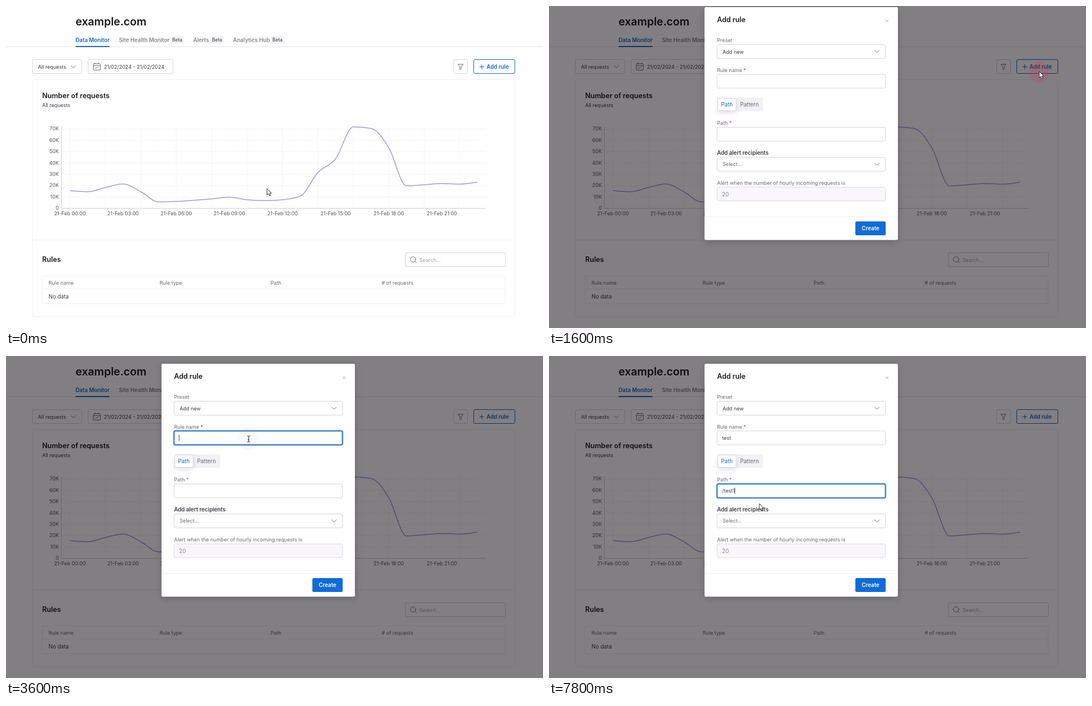
An HTML page that plays this animation: 965x580 px, repeating every 8 s.

```html
<!DOCTYPE html>
<html lang="en">
<head>
<meta charset="utf-8">
<title>Add rule</title>
<style>
html, body { margin: 0; width: 100%; height: 100%; overflow: hidden; background: #fff; }
svg { display: block; width: 965px; height: 580px; font-family: Inter, "Open Sans", sans-serif; }
text { font-size: 9.1px; fill: #3c3d45; white-space: pre; }
.h1 { font-size: 19.6px; font-weight: 600; fill: #16171c; }
.h2 { font-size: 12.6px; font-weight: 600; fill: #1c1d24; }
.tab { font-size: 9.8px; font-weight: 600; fill: #85868d; }
.blue { fill: #1567c9; }
.beta { font-size: 8.4px; font-weight: 500; fill: #4c4d54; }
.md { font-size: 9.8px; }
.bold { font-size: 9.8px; font-weight: 600; }
.dim { fill: #686a74; }
.ghost { fill: #a3a4ac; }
.axis { font-size: 9px; fill: #55565d; }
.box { fill: #fff; stroke: #d6d6dd; }
.faint { fill: none; stroke: #eff0f4; }
.icon { fill: none; stroke: #6d6e77; stroke-linecap: round; stroke-linejoin: round; }
.focus { fill: #fff; stroke: #2b78d0; stroke-width: 2; filter: drop-shadow(0 0 1.5px #7fb2ec); }
.hover { stroke: #a4a4ad; }
.req { fill: #e0315a; }
</style>
</head>
<body>
<svg viewBox="0 0 965 580">
  <g id="page">
    <text class="h1" x="125" y="35">example.com</text>
    <path d="M0 73.5H965" stroke="#e6e6ea"/>
    <path d="M125 73H186" stroke="#1567c9" stroke-width="2"/>
    <text class="tab blue" x="125" y="65">Data Monitor</text>
    <text class="tab" x="203" y="65">Site Health Monitor</text>
    <text class="tab" x="336.5" y="65">Alerts</text>
    <text class="tab" x="408" y="65">Analytics Hub</text>
    <g id="badges"></g>

    <rect class="box" x="47.5" y="96.5" width="88.5" height="25" rx="2.5"/>
    <text x="57.5" y="113">All requests</text>
    <path class="icon" d="M117 107.5l4 4 4-4"/>
    <rect class="box" x="147.5" y="96.5" width="152.5" height="25" rx="2.5"/>
    <g class="icon"><rect x="157" y="104" width="12.5" height="11.5" rx="1.5"/><path d="M157 107.5h12.5M160 102.5v2M166.500 102.5v2M160 113l2-2 1.500 1 2.500-2.500"/></g>
    <text x="176" y="113">21/02/2024 - 21/02/2024</text>
    <rect class="box" x="804.5" y="96.5" width="25" height="25" rx="2.5"/>
    <path class="icon" d="M812.500 105h9l-3.300 4.500v3.700l-2.400 1.500v-5.200z"/>
    <rect x="840.5" y="96.5" width="74" height="25" rx="2.5" fill="#fff" stroke="#1567c9"/>
    <path d="M851 109.500h8M855 105.500v8" stroke="#1567c9" stroke-width="1.100"/>
    <text class="bold blue" x="863.5" y="113">Add rule</text>

    <rect class="faint" x="47.5" y="132.5" width="867" height="427" rx="5"/>
    <path class="faint" d="M48 421.5H914"/>
    <text class="h2" x="65" y="166">Number of requests</text>
    <text x="65" y="181.500">All requests</text>
    <g id="chart"></g>

    <text class="h2" x="65" y="461">Rules</text>
    <rect class="box" x="717.5" y="444.5" width="180" height="25" rx="2.5"/>
    <g class="icon"><circle cx="731.5" cy="456.500" r="4.800"/><path d="M735 460l2.500 2.500"/></g>
    <text class="ghost" x="743" y="460.500">Search...</text>
    <rect class="faint" x="64.5" y="486.5" width="832.5" height="50" rx="3"/>
    <path class="faint" d="M65 509.5H897"/>
    <text class="dim" x="76.500" y="501.500">Rule name</text>
    <text class="dim" x="276" y="501.500">Rule type</text>
    <text class="dim" x="475.500" y="501.500">Path</text>
    <text class="dim" x="675" y="501.500"># of requests</text>
    <text class="md" x="76.500" y="526.500">No data</text>
  </g>

  <rect id="mask" width="965" height="580" fill="#040006"/>

  <g id="modal">
    <rect x="279.500" y="14" width="347.500" height="419.500" rx="2.500" fill="#fff" style="filter:drop-shadow(0 3px 6px #0003)"/>
    <path d="M280 391.5H627" stroke="#efeff3"/>
    <text class="h2" x="302" y="41">Add rule</text>
    <path d="M605 36.500l5 5m0-5l-5 5" stroke="#a2a2aa" stroke-width=".9"/>
    <text class="dim" x="302" y="77">Preset</text>
    <rect id="preset" class="box" x="302" y="81.5" width="302.500" height="25" rx="2.500"/>
    <text x="312" y="97.500">Add new</text>
    <path class="icon" d="M585.500 92l4 4 4-4"/>
    <text class="dim" x="302" y="130.500">Rule name <tspan class="req">*</tspan></text>
    <rect id="nameBox" class="box" x="302" y="135" width="302.500" height="25" rx="2.500"/>
    <text id="name" x="311" y="151"></text>
    <rect x="302" y="177" width="82.500" height="24.500" rx="2.500" fill="#f2f1f5"/>
    <rect x="303.500" y="178.500" width="32.500" height="22" rx="2" fill="#fff" stroke="#dcdbe4" style="filter:drop-shadow(0 4px 5px #50307026)"/>
    <text class="md blue" x="309.300" y="192.700">Path</text>
    <text class="md dim" x="343.500" y="192.700">Pattern</text>
    <text class="dim" x="302" y="226">Path <tspan class="req">*</tspan></text>
    <rect id="pathBox" class="box" x="302" y="230.5" width="302.500" height="25" rx="2.500"/>
    <text id="path" x="311" y="246.300"></text>
    <path id="caret" d="M0 0V11" stroke="#26272d" stroke-width=".9"/>
    <text class="bold" x="302" y="280.300">Add alert recipients</text>
    <rect class="box" x="302" y="284.5" width="302.500" height="25" rx="2.500"/>
    <text class="dim" x="312" y="300.300">Select...</text>
    <path class="icon" d="M585.500 295l4 4 4-4"/>
    <text class="dim" x="302" y="334">Alert when the number of hourly incoming requests is</text>
    <rect x="302" y="338.5" width="302.500" height="24.500" rx="2.500" fill="#f9f7fc" stroke="#dcdae2"/>
    <text class="md" x="311" y="354.700" style="fill:#85858e">20</text>
    <rect x="550.500" y="400" width="54.500" height="25" rx="2.500" fill="#0f6cd8"/>
    <text class="bold" x="562" y="416" style="fill:#fff">Create</text>
  </g>

  <circle id="ring" fill="#d0405f" stroke="#c0304f" stroke-dasharray="4 2"/>
  <path id="arrow" d="M0 0V11.200L2.600 8.900L4.500 13L6.400 12.200L4.600 8.100H8Z" fill="#fff" stroke="#1c1c20" stroke-width=".9"/>
  <path id="beam" d="M-2.500-5.500Q0-5.500 0-4Q0-5.500 2.500-5.500M0-4V4M-2.500 5.500Q0 5.500 0 4Q0 5.500 2.500 5.500M-1.500 1.500H1.500" fill="none" stroke="#1c1c20"/>
</svg>
<script>
const LOOP = 8000, TICK = 200;
const $ = id => document.getElementById(id);

function add(parent, tag, attrs, label = "") {
  const el = document.createElementNS("http://www.w3.org/2000/svg", tag);
  for (const k in attrs) el.setAttribute(k, attrs[k]);
  el.textContent = label;
  parent.append(el);
  return el;
}

// Smooth path with monotone cubic tangents over evenly spaced points
function monotone(ys, x0, dx) {
  const n = ys.length;
  const s = ys.slice(1).map((y, i) => (y - ys[i]) / dx);
  const m = ys.map((_, i) => {
    const a = s[i - 1], b = s[i];
    if (i === 0 || i === n - 1) return 0;
    return (Math.sign(a) + Math.sign(b)) *
      Math.min(Math.abs(a), Math.abs(b), Math.abs(a + b) / 4);
  });
  m[0] = (3 * s[0] - m[1]) / 2;
  m[n - 1] = (3 * s[n - 2] - m[n - 2]) / 2;
  let d = `M${x0} ${ys[0]}`;
  for (let i = 1; i < n; i++) {
    const x = x0 + i * dx, c = dx / 3;
    d += `C${x - dx + c} ${ys[i - 1] + m[i - 1] * c} ${x - c} ${ys[i] - m[i] * c} ${x} ${ys[i]}`;
  }
  return d;
}

function drawChart() {
  const g = $("chart"), x0 = 115, dx = 31.82, base = 364.5, row = 20.4;
  let grid = "";
  for (let h = 0; h < 24; h += 2) grid += `M${x0 + h * dx} 217V364`;
  for (let k = 1; k < 8; k++) grid += `M99 ${base - k * row}H862`;
  add(g, "path", { d: grid, stroke: "#ececf0", "stroke-dasharray": "2 2", fill: "none" });
  add(g, "path", { d: "M99.500 217V364.500H862", stroke: "#cfcfd5", fill: "none" });
  for (let k = 0; k < 8; k++)
    add(g, "text", { class: "axis", x: 95, y: base - k * row + 2.7, "text-anchor": "end" }, k ? k + "0K" : "0");
  for (let h = 0; h < 24; h += 3)
    add(g, "text", { class: "axis", x: x0 + h * dx, y: 376.5, "text-anchor": "middle" },
      `21-Feb ${String(h).padStart(2, "0")}:00`);
  const ys = [332.5, 334.5, 327, 320.5, 334.5, 352.8, 352, 350, 347.5, 344.3, 349, 350.6,
    349, 342.5, 300, 275, 217.8, 220.5, 255, 324, 322, 319.7, 320.8, 317.2];
  add(g, "path", { d: monotone(ys, x0, dx), fill: "none", stroke: "#a298e2", "stroke-width": 1.5 });
}

for (const x of [296, 367.5, 476]) {
  add($("badges"), "rect", { x, y: 54, width: 24, height: 14, rx: 3, fill: "#f3f3f5" });
  add($("badges"), "text", { class: "beta", x: x + 2.8, y: 64.2 }, "Beta");
}
drawChart();

// time, x, y of the pointer
const moves = [
  [0, 469, 329], [200, 488, 322], [400, 570, 286], [600, 690, 222], [800, 800, 155],
  [1000, 868, 122], [1200, 881, 118], [1600, 881, 118], [1800, 862, 117], [2000, 750, 108],
  [2200, 600, 96], [2400, 500, 90], [2600, 468, 94], [2800, 461, 108], [3000, 446, 134],
  [3200, 436, 149.5], [4400, 436, 149.5], [4600, 408, 205], [4800, 381, 247],
  [5000, 380, 249], [5200, 377, 263.5], [5400, 378, 266], [8000, 378, 266]
];
// time, value
const nameSteps = [[0, ""], [3800, "t"], [4000, "te"], [4200, "tes"], [4400, "test"]];
const pathSteps = [[0, ""], [6000, "/"], [6600, "/te"], [7000, "/tes"], [7200, "/test"], [7800, "/test1"]];
const focusSteps = [[0, ""], [3400, "name"], [5000, "path"]];
// time, modal offset, modal opacity, mask opacity
const openSteps = [[0, -95, 0, 0], [1400, -95, .1, .055], [1600, -12, 1, .5], [1800, 0, 1, .5]];
// start, x, y, then [radius, opacity] per tick
const clicks = [
  [1400, 880.5, 119, [9, .65], [18.5, .25]],
  [3200, 436, 149.5, [9, .6], [14, .35], [20, .03]],
  [5000, 380, 249, [9, .6], [14, .35], [19, .12]]
];

const at = (steps, t) => steps.findLast(s => s[0] <= t);

function pointer(t) {
  const i = Math.max(1, moves.findIndex(p => p[0] >= t));
  const [a, ax, ay] = moves[i - 1], [b, bx, by] = moves[i];
  const k = (t - a) / (b - a);
  return [ax + (bx - ax) * k, ay + (by - ay) * k];
}

function draw(t) {
  const [, shift, alpha, shade] = at(openSteps, t);
  $("modal").setAttribute("transform", `translate(0 ${shift})`);
  $("modal").setAttribute("opacity", alpha);
  $("mask").setAttribute("opacity", shade);

  const focus = at(focusSteps, t)[1];
  $("name").textContent = at(nameSteps, t)[1];
  $("path").textContent = at(pathSteps, t)[1];
  for (const id of ["name", "path"])
    $(id + "Box").setAttribute("class", focus === id ? "focus" : "box");
  $("caret").setAttribute("visibility", focus ? "visible" : "hidden");
  if (focus) {
    const x = 311 + $(focus).getComputedTextLength();
    $("caret").setAttribute("transform", `translate(${x} ${focus === "name" ? 142 : 237.3})`);
  }

  const [x, y] = pointer(t);
  const over = t >= 2200 && x < 605;
  $("preset").setAttribute("class", over && y > 80 && y < 110 ? "box hover" : "box");
  const text = over && (y > 140 && y < 160 || y > 235 && y < 255);
  $("arrow").setAttribute("visibility", text ? "hidden" : "visible");
  $("beam").setAttribute("visibility", text ? "visible" : "hidden");
  $(text ? "beam" : "arrow").setAttribute("transform", `translate(${x} ${y})`);

  const click = at(clicks, t);
  const ring = click && click[3 + (t - click[0]) / TICK];
  $("ring").setAttribute("visibility", ring ? "visible" : "hidden");
  if (ring) {
    const attrs = { cx: click[1], cy: click[2], r: ring[0], opacity: ring[1], "stroke-opacity": ring[0] === 14 ? 1 : 0 };
    for (const k in attrs) $("ring").setAttribute(k, attrs[k]);
  }
}

const start = performance.now();
function frame() {
  const t = (performance.now() - start) % LOOP;
  draw(Math.floor(t / TICK) * TICK);
  requestAnimationFrame(frame);
}
frame();
</script>
</body>
</html>
```
